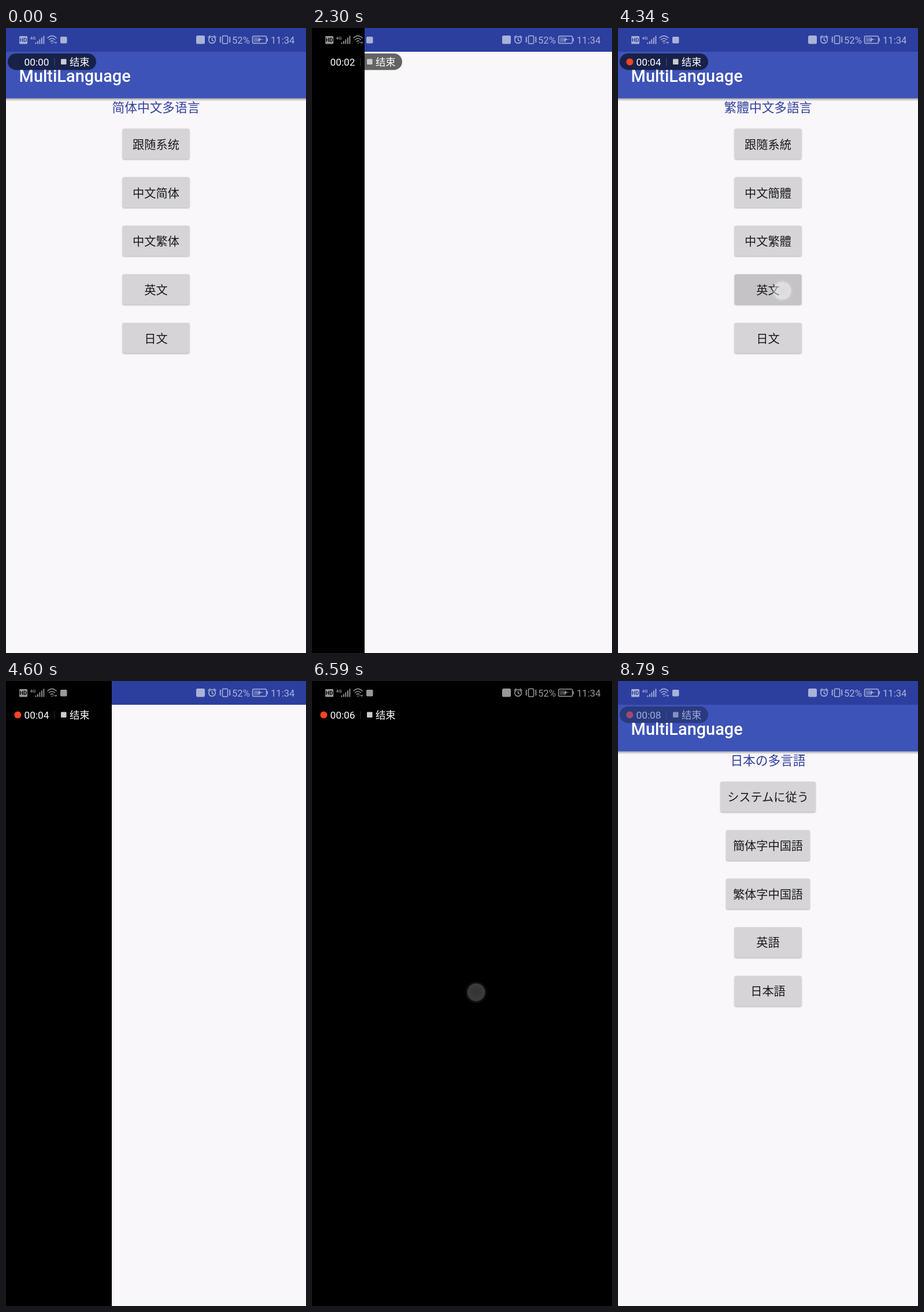
Recreate the animation shown at these times as an HTML page. Size 519x1079 px, loop 8.84 s.

```html
<!DOCTYPE html>
<html lang="zh">
<head>
<meta charset="utf-8">
<title>MultiLanguage</title>
<style>
html, body { margin: 0; width: 100%; height: 100%; overflow: hidden; background: #000; }
svg { display: block; width: 519px; height: 1079px; }
text { font-family: Roboto, "Noto Sans CJK SC", "Noto Sans CJK", sans-serif; }
.mid { text-anchor: middle; }
.zh-Hant text { font-family: Roboto, "Noto Sans CJK TC", "Noto Sans CJK", sans-serif; }
.ja text { font-family: Roboto, "Noto Sans CJK JP", "Noto Sans CJK", sans-serif; }
.head { font-size: 21.7px; fill: #303f9f; }
.label { font-size: 20.2px; font-weight: 500; fill: #19191b; }
.ja .label { font-weight: 400; }
.btn { fill: #d6d4d7; filter: drop-shadow(0 1.5px 1.2px rgba(0, 0, 0, .3)); }
.title { font-size: 28.9px; font-weight: 500; fill: #fff; }
.status text { font-size: 16.6px; }
.status .tiny { font-size: 8px; font-weight: 500; }
.hd { font-size: 9.5px; font-weight: 700; }
.line { fill: none; stroke: #fff; stroke-width: 1.5; }
.pill text { font-size: 17.3px; fill: #fff; }
</style>
</head>
<body>
<svg viewBox="0 0 519 1079">
  <defs>
    <linearGradient id="shade" x2="0" y2="1">
      <stop stop-color="#000" stop-opacity=".32"/>
      <stop offset="1" stop-color="#000" stop-opacity="0"/>
    </linearGradient>
    <radialGradient id="spot">
      <stop stop-color="#fff" stop-opacity=".8"/>
      <stop offset=".72" stop-color="#fff" stop-opacity=".95"/>
      <stop offset=".8" stop-color="#fff" stop-opacity=".3"/>
      <stop offset="1" stop-color="#fff" stop-opacity="0"/>
    </radialGradient>
    <mask id="hd">
      <rect x="22" y="13" width="16" height="15" fill="#fff"/>
      <text class="hd mid" x="30" y="24">HD</text>
    </mask>
  </defs>
  <rect width="519" height="1079"/>

  <g id="win">
    <rect width="519" height="1079" fill="#f9f7fa"/>
    <rect width="519" height="41" fill="#2c3f9f"/>
    <g id="content">
      <rect y="41" width="519" height="80.5" fill="#3d53b7"/>
      <rect y="121.5" width="519" height="5" fill="url(#shade)"/>
      <text class="title" x="22.6" y="92.5">MultiLanguage</text>
      <g id="screens"></g>
      <g id="ripple"></g>
    </g>
  </g>

  <g class="status" fill="#fff" opacity=".6">
    <rect x="23" y="14" width="14" height="13.5" rx="1.5" mask="url(#hd)"/>
    <text class="tiny" x="41.5" y="19.5">4G</text>
    <g id="bars"></g>
    <path class="line" d="M71.5 17.5Q79.5 9.5 87.5 17.5M74 20.5Q79.5 15.5 85 20.5M76.5 23.5Q79.5 21 82 23"/>
    <path d="M78 25.5l1.7 2l1.5-2zM82 26l2-3v3zM85 24h3l-2 4z"/>
    <rect x="94" y="15" width="11.5" height="11.5" rx="1.8"/>
    <rect x="329" y="13" width="15" height="14.5" rx="2.5"/>
    <circle class="line" cx="356.5" cy="20.5" r="5.8"/>
    <path class="line" d="M356.5 17v4l2.8 1.7M349.5 16.5l4-3.5M363.5 16.5l-4-3.5"/>
    <rect class="line" x="374.5" y="13.5" width="9" height="13.5" rx="1.5"/>
    <path class="line" d="M370 15l1.5 2l-1.5 2l1.5 2l-1.5 2l1.5 2M388 15l-1.5 2l1.5 2l-1.5 2l1.5 2l-1.5 2"/>
    <text x="391" y="26.5">52%</text>
    <rect class="line" x="426.5" y="14" width="24" height="12.5" rx="2"/>
    <rect x="428.5" y="16" width="10" height="8.5" opacity=".4"/>
    <path d="M430.5 20.5l7.5-1v-3l3 3h5.5l-7.5 1.5v3l-3-3.5z"/>
    <rect x="451.5" y="17.5" width="1.5" height="5.5"/>
    <text x="458" y="26.5">11:34</text>
  </g>

  <g class="pill" id="pill">
    <rect x="3" y="44" width="153" height="28.5" rx="14.2" opacity=".6"/>
    <circle id="dot" cx="20.3" cy="58.5" r="6" fill="#fb4420"/>
    <text id="clock" x="31.5" y="65">00:00</text>
    <rect x="83.3" y="52" width="1" height="13.5" fill="#fff" opacity=".2"/>
    <rect x="95" y="53.5" width="9.5" height="9.5" rx="1" fill="#ccc"/>
    <text x="110" y="65.4">结束</text>
  </g>
  <circle id="touch" cx="284" r="20" fill="url(#spot)"/>
</svg>

<script>
const LOOP = 8840, SLIDE = 375, FADE = 250, MID = 259.5;
const $ = id => document.getElementById(id);
const clamp = v => Math.min(1, Math.max(0, v));
const ramp = (t, start, length) => clamp((t - start) / length);

const languages = [
  ['zh-Hans', 0, '简体中文多语言', '跟随系统', '中文简体', '中文繁体', '英文', '日文'],
  ['zh-Hant', 0, '繁體中文多語言', '跟隨系統', '中文簡體', '中文繁體', '英文', '日文'],
  ['en', 0, 'English MultiLanguage', 'FOLLOW SYSTEM', 'SIMPLIFIED CHINESE', 'TRADITIONAL CHINESE', 'ENGLISH', 'JAPANESE'],
  ['ja', -.7, '日本の多言語', 'システムに従う', '簡体字中国語', '繁体字中国語', '英語', '日本語']
];

// tap time, end of slide, start of content fade, tapped row
const switches = [
  { tap: 1740, landed: 2511, fade: 2700, row: 2 },
  { tap: 4040, landed: 4866, fade: 5010, row: 3 },
  { tap: 6190, landed: 7110, fade: 7300, row: 4 }
];
const ticks = [770, 1780, 2790, 3785, 4800, 5780, 6800, 7810];
const blinks = [260, 1280, 2320, 3270, 4290, 5310, 6310, 7430, 8280];
const rowTop = row => 173.7 + row * 83.8;

$('screens').innerHTML = languages.map(([lang, dy, head, ...labels]) =>
  `<g class="${lang}" lang="${lang}"><text class="head mid" x="${MID}" y="${145.2 + dy}">${head}</text>` +
  labels.map((label, i) =>
    `<rect class="btn" y="${rowTop(i)}" height="52.5" rx="2.5"/>` +
    `<text class="label mid" x="${MID}" y="${rowTop(i) + 35 + dy}">${label}</text>`).join('') + '</g>').join('');
const screens = [...$('screens').children];

for (const rect of document.querySelectorAll('.btn')) {
  const width = Math.max(115.6, rect.nextSibling.getComputedTextLength() + 23.5);
  rect.setAttribute('width', width);
  rect.setAttribute('x', MID - width / 2);
}

$('bars').innerHTML = [2.5, 5, 8, 11, 14].map((h, i) =>
  `<rect x="${50.5 + i * 3.5}" y="${27.5 - h}" width="1.8" height="${h}"/>`).join('');

// Press highlight, clipped to the row's button
$('ripple').innerHTML = '<clipPath id="clip"><rect id="clipBox" x="201.7" width="115.6" height="52.5" rx="2.5"/></clipPath>' +
  '<g clip-path="url(#clip)"><circle id="wave" cx="284" opacity=".08"/></g>';

function draw(t) {
  const current = switches.filter(s => t >= s.tap).pop();
  let lang = 0, x = 0, alpha = 1, touch = 0, wave = 0;
  if (current) {
    const { tap, landed, fade, row } = current;
    const replaced = t >= tap + 330;
    lang = switches.indexOf(current) + (replaced ? 1 : 0);
    touch = .5 * ramp(t, tap - 40, 80) * (1 - ramp(t, tap + 300, 200));
    if (replaced) {
      x = Math.round(519 * Math.pow(1 - ramp(t, landed - SLIDE, SLIDE), 3));
      alpha = ramp(t, fade, FADE);
    } else {
      wave = 90 * ramp(t, tap, 300);
    }
    const y = rowTop(row) + 28.5;
    $('touch').setAttribute('cy', y);
    $('wave').setAttribute('cy', y);
    $('clipBox').setAttribute('y', rowTop(row));
  }
  $('win').setAttribute('transform', `translate(${x})`);
  $('content').setAttribute('opacity', alpha);
  screens.forEach((s, i) => s.setAttribute('visibility', i === lang ? 'visible' : 'hidden'));
  $('touch').setAttribute('opacity', touch);
  $('wave').setAttribute('r', wave);

  const passed = list => list.filter(v => t >= v).length;
  const seconds = passed(ticks);
  $('clock').textContent = '00:0' + seconds;
  $('dot').setAttribute('visibility', passed(blinks) > seconds ? 'visible' : 'hidden');
  $('pill').setAttribute('opacity', 1 - .5 * ramp(t, 8560, 230));
}

const begin = performance.now();
function frame() {
  draw((performance.now() - begin) % LOOP);
  requestAnimationFrame(frame);
}
frame();
</script>
</body>
</html>
```
